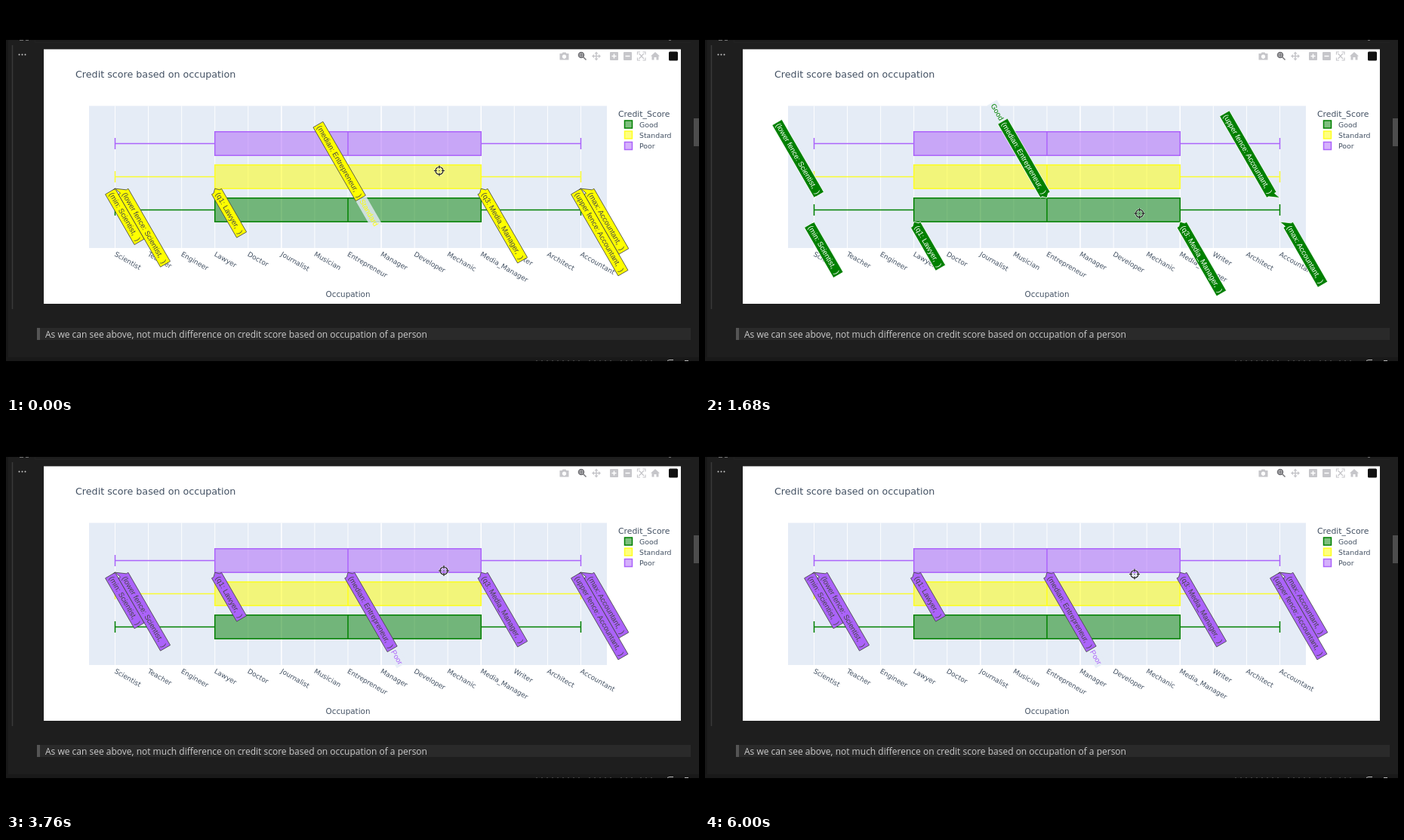
These frames come from a looping animation (918x516 px, 6.08 s). An HTML page:

```html
<!DOCTYPE html>
<html lang="en">
<head>
<meta charset="utf-8">
<title>Credit score box plot</title>
<style>
  html, body { margin: 0; width: 100%; height: 100%; overflow: hidden; background: #000; }
  svg { display: block; width: 918px; height: 516px; }
  text { white-space: pre; }
  .plot { font-family: "DejaVu Sans", Verdana, sans-serif; fill: #425062; }
  .hover { font: 9.75px "Liberation Sans", Arial, sans-serif; visibility: hidden; }
  .hover.on { visibility: visible; }
  .note { font: 12px "Open Sans", "Noto Sans", sans-serif; fill: #ccc; }
</style>
</head>
<body>
<svg id="stage" viewBox="0 0 918 516">
  <rect width="918" height="516"/>
  <rect y="45" width="918" height="426" fill="#1e1e1e"/>
  <rect y="45" width="3" height="426" fill="#181818"/>
  <path d="M8.5 52V402" stroke="#3a3a3a" stroke-width="1.5"/>
  <path d="M18 45.5h5M26 45.5h4M878 45.5h3" stroke="#777"/>
  <path d="M38.5 45V48.5H907" fill="none" stroke="#222"/>
  <g fill="#ccc"><circle cx="17.5" cy="64.5" r="1"/><circle cx="21.5" cy="64.5" r="1"/><circle cx="25.5" cy="64.5" r="1"/></g>
  <rect x="911" y="149" width="7" height="37" fill="#4d4d4d"/>
  <rect x="45" y="427" width="862" height="16" fill="#2a2a2a"/>
  <rect x="41" y="427" width="4" height="16" fill="#555"/>
  <text class="note" x="52" y="440">As we can see above, not much difference on credit score based on occupation of a person</text>
  <rect y="466" width="918" height="5" fill="#191919"/>
  <path d="M702 470.5h58M772 470.5h33M814 470.5h16M840 470.5h20" stroke="#444" stroke-dasharray="2 5"/>
  <path d="M876 470.5l3-1h5M899 470.5h5" stroke="#bbb" fill="none"/>

  <rect x="50" y="57.4" width="844" height="337.6" fill="#fff"/>
  <g id="tools" fill="#c6c6ca">
    <path fill-rule="evenodd" d="M733.5 63h3l1-1.5h4l1 1.5h3v8.500h-12zM739.5 64.5a2.7 2.7 0 1 0 .01 0z"/>
    <circle cx="762" cy="65" r="3.3" fill="none" stroke="#77777b" stroke-width="2"/>
    <path d="M764.5 67.5l4 4M760 65h4M762 63v4" stroke="#77777b" stroke-width="1.5"/>
    <path d="M782 60.5l2.5 3h-1.8v2.3h2.3v-1.8l3 2.5-3 2.5v-1.8h-2.3v2.3h1.8l-2.5 3-2.5-3h1.8v-2.3h-2.3v1.8l-3-2.5 3-2.5v1.8h2.3v-2.3h-1.8z"/>
    <rect x="800" y="61" width="11" height="11" rx="1"/>
    <rect x="818" y="61" width="11" height="11" rx="1"/>
    <path d="M802.5 66.5h6M805.5 63.5v6M820.5 66.5h6" stroke="#fff" stroke-width="1.5"/>
    <path d="M836.5 64.500v-3.5h3.5M843.5 61h3.5v3.5M847 68.5v3.5h-3.5M840 72h-3.5v-3.5M838.5 63l6.500 7M845 63l-6.500 7" fill="none" stroke="#c6c6ca" stroke-width="1.2"/>
    <path d="M860 61l6 5.5h-1.5v5h-3v-3.5h-3v3.5h-3v-5H854z"/>
    <rect x="878" y="60.5" width="12" height="12" rx="1.5" fill="#111"/>
  </g>
  <g class="plot">
    <rect x="110" y="132.5" width="686" height="188.5" fill="#e5ecf6"/>
    <text x="92" y="94.5" font-size="12.69">Credit score based on occupation</text>
    <text x="453" y="385.5" font-size="10.38" text-anchor="middle">Occupation</text>
    <text x="811" y="146.5" font-size="10.85">Credit_Score</text>
    <g id="axis"></g>
    <g id="boxes" stroke-width="1.5"></g>
  </g>
  <g id="hovers"></g>
  <g id="cursor" fill="none">
    <g id="cross"><circle r="5"/><path d="M0-7v4M0 7v-4M-7 0h4M7 0h-4"/></g>
    <circle r=".7" fill="#222"/>
  </g>
</svg>
<script>
const NS = 'http://www.w3.org/2000/svg';
const $ = id => document.getElementById(id);
const add = (parent, tag, attrs, text) => {
  const el = document.createElementNS(NS, tag);
  for (const k in attrs) el.setAttribute(k, attrs[k]);
  if (text) el.textContent = text;
  return parent.appendChild(el);
};

// Axis
const jobs = ['Scientist', 'Teacher', 'Engineer', 'Lawyer', 'Doctor', 'Journalist', 'Musician',
  'Entrepreneur', 'Manager', 'Developer', 'Mechanic', 'Media_Manager', 'Writer', 'Architect', 'Accountant'];
const tickX = i => 144.5 + i * 44.07;
jobs.forEach((job, i) => {
  const x = tickX(i), strong = [5, 8, 11].includes(i);
  add($('axis'), 'path', { d: `M${x} 132.5V321`, stroke: '#fff', 'stroke-width': strong ? 1.5 : 0.9 });
  add($('axis'), 'text', { transform: `translate(${x - 1.5} 331) rotate(30)`, 'font-size': 9 }, job);
});

// Box plots and legend
const series = {
  Good: { color: '#008000', line: 1, y: 270.5, ink: '#fff', legend: 157 },
  Standard: { color: '#ffff00', line: 0.8, y: 226.5, ink: '#444', legend: 171 },
  Poor: { color: '#ab63fa', line: 1, y: 182.5, ink: '#444', legend: 185.5 }
};
const [lo, q1, med, q3, hi] = [0, 3, 7, 11, 14].map(tickX);
for (const name in series) {
  const { color, line, y, legend } = series[name];
  const stroke = { stroke: color, 'stroke-opacity': line };
  const paint = { fill: color, 'fill-opacity': 0.5, ...stroke };
  add($('boxes'), 'rect', { x: q1, y: y - 15.7, width: q3 - q1, height: 31.4, ...paint });
  add($('boxes'), 'path', {
    d: `M${med} ${y - 15.7}v31.4M${lo} ${y}H${q1}M${q3} ${y}H${hi}M${lo} ${y - 7.5}v15M${hi} ${y - 7.5}v15`,
    ...stroke
  });
  add($('boxes'), 'rect', { x: 819.5, y: legend - 5, width: 10, height: 10, ...paint });
  add($('boxes'), 'text', { x: 839, y: legend + 3.5, 'font-size': 9.35 }, name);
}

// Hover labels, turned by 60 degrees around the tip
const pen = document.createElement('canvas').getContext('2d');
pen.font = '9.75px "Liberation Sans", Arial, sans-serif';
const widthOf = text => pen.measureText(text).width + 4.5;
const HALF = 7.5, ARROW = 4.5;

// side: 1 below the tip, -1 above it, 0 across it; shift moves the box sideways on screen
function label(group, s, x, y, text, side, shift, name) {
  const g = add(group, 'g', { transform: `translate(${x} ${y}) rotate(60)` });
  const w = widthOf(text), cy = -0.866 * shift;
  const near = side ? side * ARROW + shift / 2 : 19.5;
  const left = side > 0 ? near : near - w;
  const far = side > 0 ? near + w : near - w;
  if (name) {
    const nw = widthOf(name), nx = side < 0 ? left - nw : left + w;
    add(g, 'rect', { x: nx, y: cy - HALF, width: nw, height: 2 * HALF, fill: '#e5ecf6', 'fill-opacity': 0.8 });
    add(g, 'text', { x: nx + 2.25, y: cy + 3.4, fill: s.color }, name);
  }
  const arrow = side ? `M0 0L${near} ${cy + ARROW}` : `M${near} ${cy}`;
  const close = side ? `V${cy - ARROW}Z` : 'Z';
  add(g, 'path', {
    d: `${arrow}V${cy + HALF}H${far}V${cy - HALF}H${near}${close}`,
    fill: s.color, stroke: s.ink, 'stroke-width': 0.75
  });
  add(g, 'text', { x: left + 2.25, y: cy + 3.4, fill: s.ink }, text);
}

const gap = 8.7, groups = {};
for (const name in series) {
  const s = series[name], g = add($('hovers'), 'g', { class: 'hover' });
  const low = s.y + 15.7, green = name === 'Good';
  const fenceY = green ? s.y - 16 : low, fenceSide = green ? -1 : 1;
  const put = (x, y, text, side, shift, tag) => label(g, s, x, y, `(${text},\u00a0\u00a0)`, side, shift, tag);
  put(lo, low, 'min: Scientist', 1, -gap);
  put(lo, fenceY, 'lower fence: Scientist', fenceSide, gap);
  put(q1, low, 'q1: Lawyer', 1, 0);
  if (name === 'Standard') put(med, low, 'median: Entrepreneur', 0, 9.5, name);
  else put(med, fenceY, 'median: Entrepreneur', fenceSide, 0, name);
  put(q3, low, 'q3: Media_Manager', 1, 0);
  put(hi, low, 'max: Accountant', 1, gap);
  put(hi, fenceY, 'upper fence: Accountant', fenceSide, -gap);
  groups[name] = g;
}

// Pointer
const cross = $('cross'), halo = cross.cloneNode(true);
halo.removeAttribute('id');
halo.setAttribute('stroke', '#fff');
halo.setAttribute('stroke-width', 2.6);
halo.setAttribute('opacity', 0.55);
cross.setAttribute('stroke', '#222');
cross.setAttribute('stroke-width', 1.2);
cross.before(halo);

// Timeline
const LOOP = 6080, STEP = 80;
const path = [[0, 574, 218.5], [320, 575, 196], [720, 576, 192], [1040, 575.5, 224.5], [1440, 575, 262],
  [1840, 576, 284], [2160, 576, 284], [2240, 577.5, 285], [2800, 577.5, 285], [3120, 578, 258],
  [3360, 579, 222], [3600, 580, 195], [3760, 580, 196], [4000, 581, 208], [4560, 583, 257.5],
  [4880, 584, 276], [5120, 583, 272], [5360, 581.5, 250.5], [5680, 575, 215], [6000, 569, 200.5]];
const hovered = [[0, 'Standard'], [240, 'Poor'], [960, 'Standard'], [1360, 'Good'], [3120, 'Standard'],
  [3440, 'Poor'], [4000, 'Standard'], [4640, 'Good'], [5280, 'Standard'], [5760, 'Poor']];

function pointerAt(t) {
  const i = path.findIndex(p => p[0] > t);
  if (i < 0) return path[path.length - 1].slice(1);
  const a = path[i - 1], b = path[i], k = (t - a[0]) / (b[0] - a[0]);
  return [1, 2].map(n => a[n] + (b[n] - a[n]) * k);
}

function draw(now) {
  const t = Math.floor((now % LOOP) / STEP) * STEP;
  const active = hovered.filter(h => h[0] <= t).pop()[1];
  for (const name in groups) groups[name].classList.toggle('on', name === active);
  $('cursor').setAttribute('transform', `translate(${pointerAt(t).join(' ')})`);
}

const start = performance.now();
function tick() {
  draw(performance.now() - start);
  requestAnimationFrame(tick);
}
tick();
</script>
</body>
</html>
```
